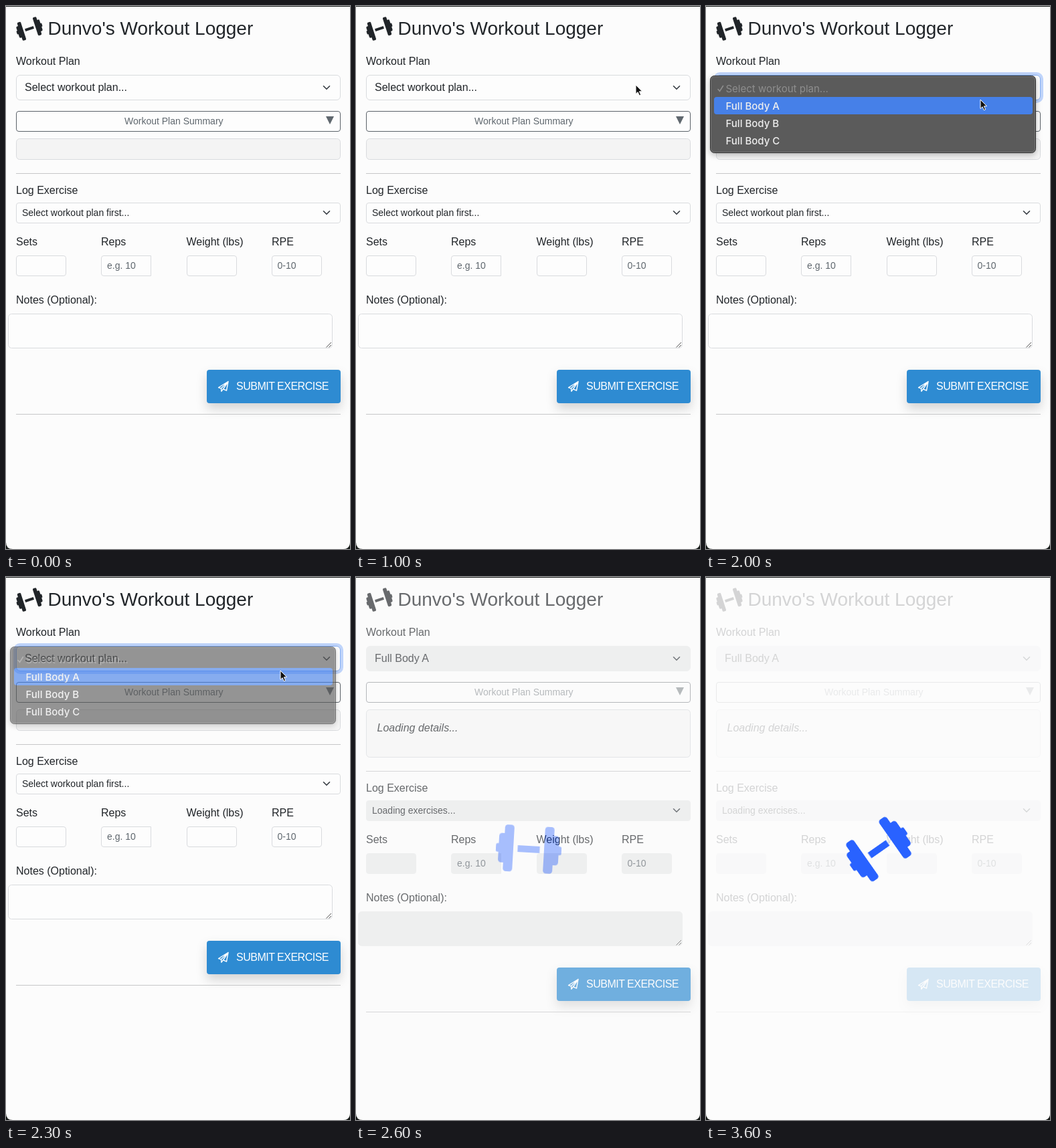
These frames come from a looping animation (514x812 px, 3.7 s). An HTML page:

```html
<!DOCTYPE html>
<html lang="en">
<head>
<meta charset="utf-8">
<title>Workout Logger</title>
<style>
  html, body { margin: 0; width: 100%; height: 100%; overflow: hidden; background: #161a18; }
  svg { display: block; width: 514px; height: 812px; }
  text { font: 16px "Liberation Sans", Arial, sans-serif; fill: #212529; white-space: pre; }
  .title { font-size: 28px; }
  .small { font-size: 14px; }
  .muted { fill: #5f676e; }
  .field { fill: #fdfdfd; stroke: #d9dbde; }
  .rule { stroke: #c6c7c8; }
  .chevron { fill: none; stroke: #343a40; stroke-width: 1.6; stroke-linecap: round; stroke-linejoin: round; }
  .submit { fill: #2e8bd2; filter: drop-shadow(0 8px 8px rgba(0, 0, 0, .16)); }
  .submit-label { fill: #fff; letter-spacing: -.5px; }
  .menu text { font: 500 15px Inter, "Open Sans", sans-serif; fill: #eee; }
  .menu .off { font-weight: 400; fill: #8e8e8e; }

  .idle, .busy, .lower, .field, .dim, .focus, .menu, .pick, .veil, .spin, .cursor {
    animation: 3.7s infinite step-end;
  }
  .idle { animation-name: idle; }
  .busy { animation-name: busy; }
  .lower { animation-name: drop; }
  .field { animation-name: disable; }
  .dim { animation-name: dim; }
  .focus { animation-name: focus; }
  .menu { animation-name: menu; }
  .pick { animation-name: pick; }
  .veil { animation-name: veil; }
  .spin { animation-name: spin; }
  .cursor { animation-name: cursor; }

  @keyframes idle { 0% { opacity: 1 } 70.2%, 100% { opacity: 0 } }
  @keyframes busy { 0% { opacity: 0 } 70.2%, 100% { opacity: 1 } }
  @keyframes drop { 0% { transform: none } 70.2%, 100% { transform: translateY(40px) } }
  @keyframes disable {
    0% { fill: #fdfdfd; stroke: #d9dbde }
    70.2%, 100% { fill: #e9eaeb; stroke: #e9eaeb }
  }
  @keyframes dim { 0% { opacity: 1 } 70.2%, 100% { opacity: .65 } }
  @keyframes focus { 0% { opacity: 0 } 29.7% { opacity: 1 } 70.2%, 100% { opacity: 0 } }
  @keyframes menu {
    0% { opacity: 0 }
    29.7% { opacity: 1 }
    62.1% { opacity: .65 }
    64.8% { opacity: .24 }
    67.5%, 100% { opacity: 0 }
  }
  @keyframes pick { 0% { opacity: 0 } 43.2% { opacity: 1 } 59.4% { opacity: 0 } 62.1%, 100% { opacity: 1 } }
  @keyframes veil {
    0% { opacity: 0 }
    70.2% { opacity: .4 }
    72.9% { opacity: .75 }
    75.6%, 100% { opacity: 1 }
  }
  @keyframes spin {
    0% { transform: rotate(3.3deg) }
    70.2% { transform: rotate(3.3deg); animation-timing-function: steps(11) }
    100% { transform: rotate(159.2deg) }
  }
  @keyframes cursor {
    0% { transform: translate(506px, 44px); opacity: 0 }
    2.7% { transform: translate(506px, 44px); opacity: 1; animation-timing-function: steps(2) }
    8.1% { transform: translate(452px, 90px); opacity: 1; animation-timing-function: steps(3) }
    16.2% { transform: translate(420px, 116px); opacity: 1 }
    24.3% { transform: translate(418px, 118px); opacity: 1 }
    27% { transform: translate(418px, 118px); opacity: 1; animation-timing-function: steps(5) }
    40.5% { transform: translate(411px, 135px); opacity: 1; animation-timing-function: steps(5) }
    54% { transform: translate(410px, 140px); opacity: 1 }
    70.2%, 100% { transform: translate(410px, 140px); opacity: 0 }
  }
</style>
</head>
<body>
<svg viewBox="0 0 514 812">
  <defs>
    <g id="side">
      <rect x="23" y="-35" width="14" height="70" rx="4.5"/>
      <rect x="32" y="-22" width="13" height="44" rx="4.5"/>
      <rect x="42" y="-6.5" width="7" height="13" rx="2.5"/>
    </g>
    <g id="dumbbell">
      <use href="#side"/>
      <use href="#side" transform="scale(-1)"/>
      <rect x="-16.5" y="-5" width="33" height="10"/>
    </g>
    <path id="chevron" d="M-4.5-2.2 0 2.3 4.5-2.2"/>
  </defs>

  <path d="M0 1H514V802Q514 812 504 812H10Q0 812 0 802Z" fill="#fcfcfc"/>

  <use href="#dumbbell" transform="translate(35 34) rotate(-18) scale(.405)" fill="#212529"/>
  <text class="title" x="62.5" y="43">Dunvo's Workout Logger</text>

  <text x="15" y="88">Workout Plan</text>
  <rect class="focus" x="13" y="101" width="489" height="42" rx="8" fill="none" stroke="#c0d5fb" stroke-width="4"/>
  <rect class="field" x="15.5" y="103.5" width="484" height="37" rx="5.5"/>
  <rect class="focus" x="15.5" y="103.5" width="484" height="37" rx="5.5" fill="none" stroke="#86b0f5"/>
  <text class="idle" x="28" y="127">Select workout plan...</text>
  <text class="busy" x="28" y="127">Full Body A</text>
  <use class="chevron" href="#chevron" x="479" y="122"/>

  <g class="dim">
    <rect x="15.5" y="157.5" width="484" height="30" rx="3.5" fill="#fdfdfd" stroke="#5c636a"/>
    <text class="small muted" x="177" y="177">Workout Plan Summary</text>
    <path d="M478 165H490L484 177Z" fill="#5f676e"/>
  </g>

  <rect class="idle" x="15.5" y="198.5" width="484" height="31" rx="5" fill="#f4f4f4" stroke="#d9dbde"/>
  <g class="busy">
    <rect x="15.5" y="198.5" width="484" height="71" rx="5" fill="#f6f6f6" stroke="#d9dbde"/>
    <text x="31.5" y="231" font-style="italic" style="font-style:italic">Loading details...</text>
  </g>

  <g class="lower">
    <path class="rule" d="M15 250.5H500"/>
    <text x="15" y="281">Log Exercise</text>
    <rect class="field" x="15.5" y="294.5" width="484" height="30" rx="3.5"/>
    <text class="small idle" x="24" y="314">Select workout plan first...</text>
    <text class="small busy" x="24" y="314">Loading exercises...</text>
    <use class="chevron" href="#chevron" x="479" y="309"/>

    <text x="15" y="358">Sets</text>
    <text x="142" y="358">Reps</text>
    <text x="269.5" y="358">Weight (lbs)</text>
    <text x="397" y="358">RPE</text>
    <rect class="field" x="15.5" y="373.5" width="74" height="30" rx="3.5"/>
    <path class="field" d="M146 373.5H216.500V403.500H146Q142.500 403.500 142.500 400V377Q142.500 373.500 146 373.500Z"/>
    <rect class="field" x="270.500" y="373.500" width="74" height="30" rx="3.500"/>
    <rect class="field" x="397.500" y="373.500" width="74" height="30" rx="3.500"/>
    <text class="small muted" x="151" y="393">e.g. 10</text>
    <text class="small muted" x="405.500" y="393">0-10</text>

    <text x="15" y="445">Notes (Optional):</text>
    <rect class="field" x="3.500" y="460.500" width="484" height="51" rx="5"/>
    <path d="M478.500 510.500 486 503M482.500 510.500 486 507" stroke="#555"/>

    <rect class="submit" x="300" y="544" width="200" height="50" rx="4"/>
    <path d="M317.500 570.500 332 561.500 329.500 575 324.500 572.800 321.800 576.300 321.500 571.800ZM321.500 571.800 332 561.500 324.500 572.800" fill="none" stroke="#fff" stroke-width="1.400" stroke-linejoin="round"/>
    <text class="submit-label" x="344" y="574">SUBMIT EXERCISE</text>
    <path class="rule" d="M15 610.500H500"/>
  </g>

  <g class="menu">
    <rect x="6.500" y="104.500" width="486" height="115" rx="6" fill="#5b5b5b" stroke="#2b2b2b" style="filter:drop-shadow(0 3px 4px rgba(0,0,0,.25))"/>
    <rect x="7.500" y="105.500" width="484" height="113" rx="5" fill="none" stroke="#777"/>
    <rect class="pick" x="12" y="136" width="476" height="26" rx="4" fill="#4680e8"/>
    <path d="M18 124.500 20.500 127.500 25.500 119.500" fill="none" stroke="#8e8e8e" stroke-width="1.600" stroke-linecap="round"/>
    <text class="off" x="29.500" y="129">Select workout plan...</text>
    <text x="29.500" y="155">Full Body A</text>
    <text x="29.500" y="181">Full Body B</text>
    <text x="29.500" y="207">Full Body C</text>
  </g>

  <g class="veil">
    <path d="M0 1H514V802Q514 812 504 812H10Q0 812 0 802Z" fill="#fcfcfc" opacity=".82"/>
    <g transform="translate(258 407)">
      <use class="spin" href="#dumbbell" fill="#2962ff"/>
    </g>
  </g>

  <path class="cursor" d="M0 0V13.500L3.100 10.700 5.300 15.800 7.600 14.800 5.400 9.800H9.600Z" fill="#111" stroke="#fff" stroke-linejoin="round"/>
</svg>
</body>
</html>
```
